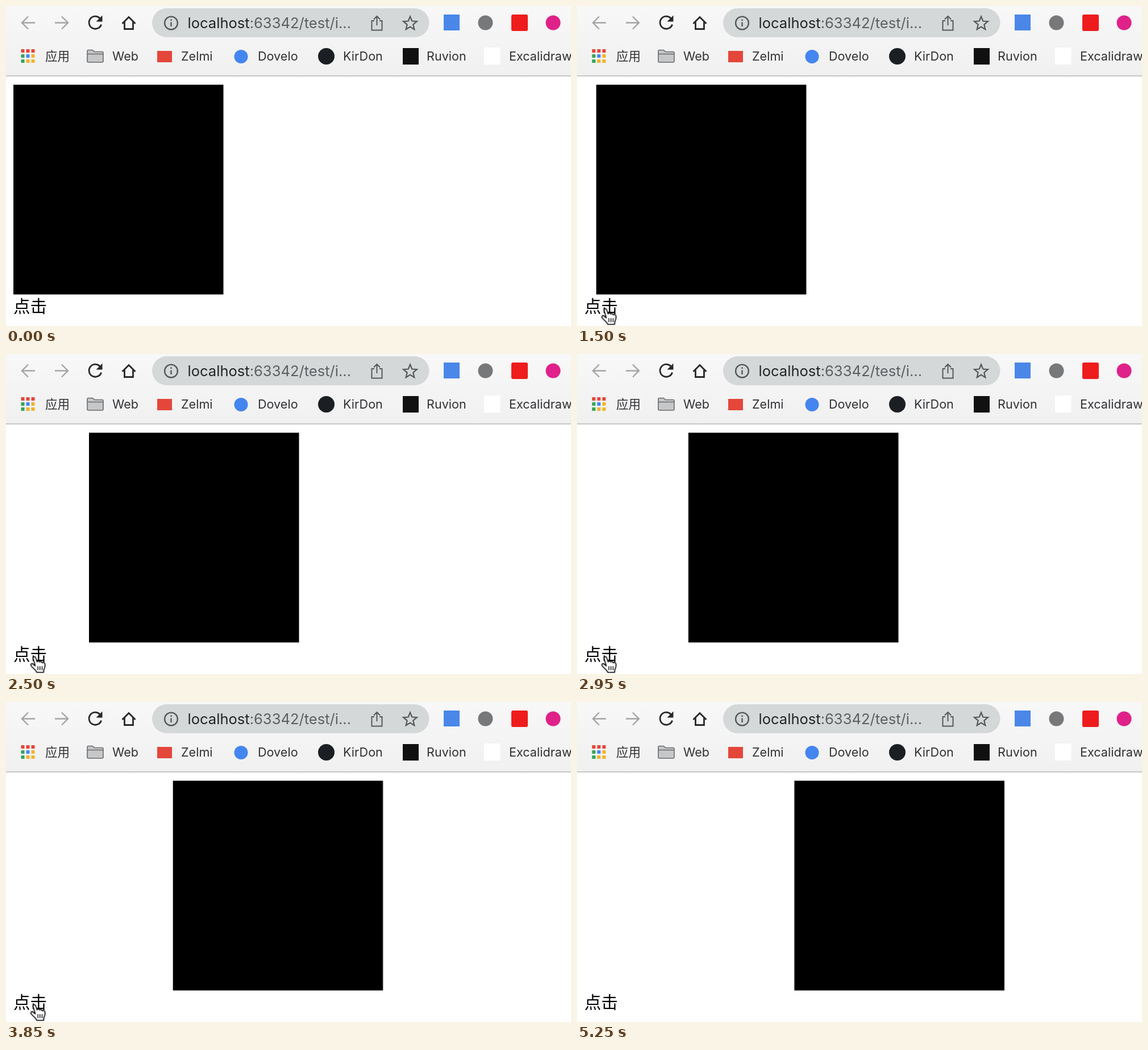
Recreate the animation shown at these times as an HTML page. Size 994x563 px, loop 6.15 s.

```html
<!DOCTYPE html>
<html lang="zh">
<head>
<meta charset="utf-8">
<title>Moving box</title>
<style>
  html, body { margin: 0; width: 100%; height: 100%; overflow: hidden; background: #fff; }
  svg { position: absolute; left: 0; top: 0; display: block; }
  text { font-family: Inter, "Noto Sans CJK SC", "Noto Sans CJK", sans-serif; }
  .marks text { font-size: 21.6px; fill: #303134; }
  .url { font-size: 25.55px; fill: #5d6063; }
  .url tspan { fill: #222427; }
  .line { fill: none; stroke-linejoin: miter; }
  .page { font-family: "Noto Sans CJK SC", "Noto Sans CJK", sans-serif; font-size: 29.5px; }

  #box, #cursor, #arrow, #hand { animation: 6150ms step-end infinite; }
  #box { animation-name: slide; }
  #cursor { animation-name: travel; }
  #arrow { animation-name: arrow; }
  #hand { animation-name: hand; }

  /* The picture advances every 50 ms, so each stretch is stepped. */
  @keyframes slide {
    0% { transform: translateX(0); }
    19.512% { transform: translateX(3.8px); }
    21.951% { transform: translateX(3.8px); animation-timing-function: steps(12); }
    31.707% { transform: translateX(72px); animation-timing-function: steps(11); }
    40.65% { transform: translateX(133px); animation-timing-function: steps(16); }
    53.658% { transform: translateX(221.8px); animation-timing-function: steps(3); }
    56.097% { transform: translateX(236.3px); animation-timing-function: steps(10); }
    64.227% { transform: translateX(291.8px); animation-timing-function: steps(7); }
    69.918% { transform: translateX(332.5px); animation-timing-function: steps(6); }
    74.796% { transform: translateX(365.3px); }
    75.609%, 100% { transform: translateX(369.4px); }
  }
  @keyframes travel {
    0% { transform: translate(955px, 16px); }
    .813% { transform: translate(955px, 16px); animation-timing-function: steps(3); }
    3.252% { transform: translate(800px, 140px); animation-timing-function: steps(3); }
    5.691% { transform: translate(490px, 350px); animation-timing-function: steps(3); }
    8.13% { transform: translate(170px, 490px); animation-timing-function: steps(2); }
    9.756% { transform: translate(58px, 529px); }
    10.569% { transform: translate(46px, 532px); }
    11.382% { transform: translate(49px, 533px); }
    12.195% { transform: translate(50px, 533px); }
    84.552%, 100% { transform: translate(21px, 451px); }
  }
  @keyframes arrow {
    0% { opacity: 0; }
    .813% { opacity: 1; }
    10.569% { opacity: 0; }
    84.552% { opacity: 1; }
    85.365%, 100% { opacity: 0; }
  }
  @keyframes hand {
    0% { opacity: 0; }
    10.569% { opacity: 1; }
    84.552%, 100% { opacity: 0; }
  }
</style>
</head>
<body>
<svg width="994" height="563" viewBox="0 0 994 563">
  <defs>
    <linearGradient id="bar" x2="0" y2="1">
      <stop stop-color="#f8f8f8"/>
      <stop offset="1" stop-color="#f0f0f0"/>
    </linearGradient>
  </defs>
  <rect width="994" height="123" fill="url(#bar)"/>
  <rect y="122" width="994" height="2" fill="#c7c7c7"/>

  <!-- Toolbar -->
  <g class="line" stroke="#a3a4a6" stroke-width="2.4">
    <path d="M51 29.5H28M39 18.5 28 29.5 39 40.5"/>
    <path d="M86 29.5H109M98 18.5 109 29.5 98 40.5"/>
  </g>
  <g class="line" stroke="#26282a" stroke-width="2.8">
    <path d="M167.6 32.5A11 11 0 1 1 165 21.5"/>
    <path d="M204.5 31 216 19.5 227.5 31M208.5 28V40.5H223.5V28"/>
  </g>
  <path d="M169.5 16.5V27.5H158.5Z" fill="#26282a"/>
  <rect x="257" y="4" width="487.5" height="51" rx="25.5" fill="#d5d8d8"/>
  <g class="line" stroke="#55585b" stroke-width="2.4">
    <circle cx="290.5" cy="30" r="11.4"/>
    <path d="M290.5 28.5V36M290.5 23.3V26"/>
    <path d="M648 26H643.5V42.5H661.5V26H657M652.5 34V18.5M647 23.5 652.5 18 658 23.5" stroke-width="2"/>
    <path d="M711 18.5 714.3 26.5 722.9 27.2 716.3 32.7 718.3 41.1 711 36.6 703.7 41.1 705.7 32.7 699.1 27.2 707.7 26.5Z" stroke-width="2.2"/>
  </g>
  <text class="url" x="319.5" y="39"><tspan>localhost</tspan>:63342/test/i...</text>
  <rect x="770" y="15" width="28" height="28" fill="#4a87e8"/>
  <circle cx="843.5" cy="29.5" r="13" fill="#77787a"/>
  <rect x="889" y="15" width="29" height="29" rx="3" fill="#ee1c1c"/>
  <circle cx="962.5" cy="29.5" r="13" fill="#e0218a"/>

  <!-- Bookmarks -->
  <g class="marks">
    <path d="M26.5 76h6v6h-6zM35.5 76h6v6h-6zM44.5 76h6v6h-6z" fill="#e4463a"/>
    <path d="M26.5 85h6v6h-6zM26.5 94h6v6h-6z" fill="#35a456"/>
    <path d="M35.5 85h6v6h-6z" fill="#4485f0"/>
    <path d="M44.5 85h6v6h-6zM35.5 94h6v6h-6zM44.5 94h6v6h-6z" fill="#f3b32b"/>
    <text x="69" y="96">应用</text>
    <path d="M143 97V79.5Q143 77.5 145 77.5H152.5L155.5 80.5H169Q171 80.5 171 82.5V97Q171 99 169 99H145Q143 99 143 97ZM143 84.5H171" fill="#c6c7c8" stroke="#6a6b6d" stroke-width="1.6"/>
    <text x="187" y="96">Web</text>
    <rect x="266" y="79" width="26" height="20" fill="#e4463a"/>
    <text x="308" y="96">Zelmi</text>
    <circle cx="413.5" cy="89" r="12" fill="#4485f0"/>
    <text x="443" y="96">Dovelo</text>
    <circle cx="563.5" cy="88.5" r="14.5" fill="#1b1f23"/>
    <text x="593" y="96">KirDon</text>
    <rect x="698" y="74" width="28" height="29" fill="#111"/>
    <text x="740" y="96">Ruvion</text>
    <rect x="841" y="73" width="28.5" height="30" fill="#fff"/>
    <text x="885" y="96">Excalidraw</text>
  </g>

  <!-- Page -->
  <rect id="box" x="13" y="138.5" width="369.5" height="369"/>
  <text class="page" x="13" y="539">点击</text>

  <g id="cursor">
    <path id="arrow" d="M1 1V25.5L6.5 20.5 10.3 29 14.3 27.2 10.6 18.8H18.5Z" stroke="#fff" stroke-width="2"/>
    <g id="hand" transform="translate(-8.5 -2.8)" stroke="#111" stroke-width="1.8" stroke-linecap="round" stroke-linejoin="round">
      <path d="M9.5 16.5 6.3 6C5.3 2.4 9.4 1 10.7 4.2L13.3 11.5C14 9.7 17 9.7 17.7 11.7 19 10.3 21.7 10.9 22.1 13 24 11.9 26.7 12.7 27.2 15.5 27.7 19.5 26.5 22.5 25 25.5L24.7 29.8H12.5C11.5 26 7 23.5 3.7 19.5 0.5 16 3.5 13.2 6.5 15.5L9.9 18.5Z" fill="#fff"/>
      <path d="M14.5 19.5V25.5M18.3 19.5V25.5M22 19.5V25.5" fill="none" stroke-width="1.5"/>
    </g>
  </g>
</svg>
</body>
</html>
```
